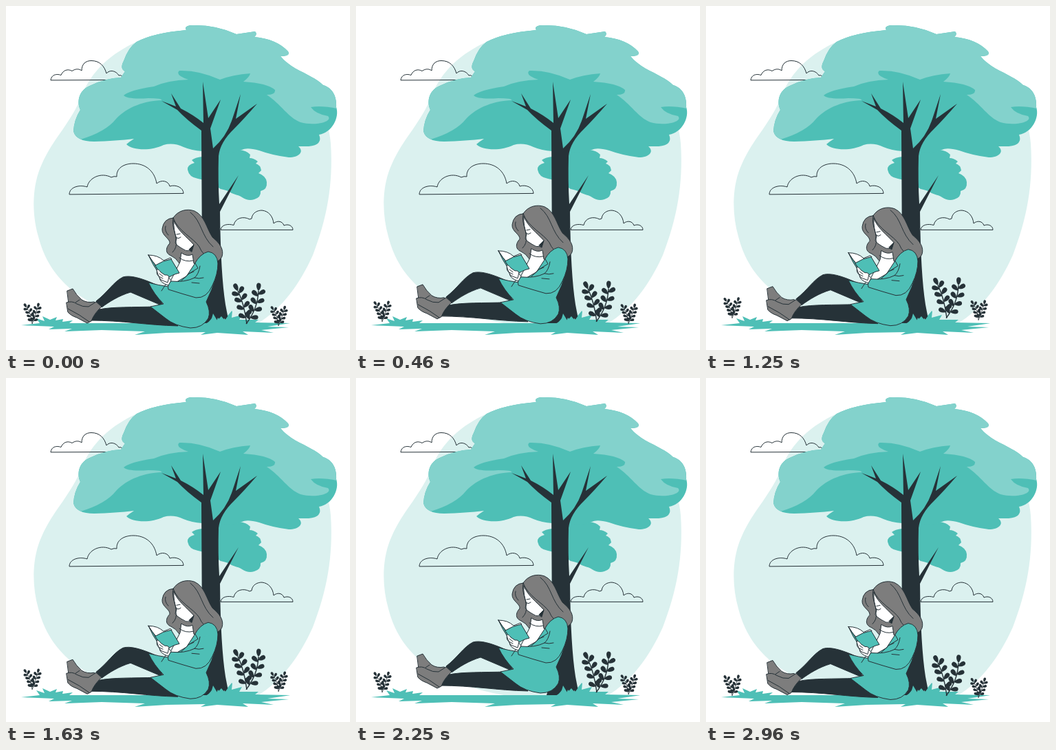
These frames come from a looping animation (500 px wide and 500 px high, 3 s). An HTML page:

```html
<!DOCTYPE html>
<html lang="en">
<head>
<meta charset="utf-8">
<title>Reading under a tree</title>
<style>
  html, body { margin: 0; width: 100%; height: 100%; overflow: hidden; background: #fff; }
  svg { display: block; width: 100vw; height: 100vh; }
  .teal { fill: #4ebfb6; }
  .light { fill: #83d2cc; }
  .dark { fill: #263238; }
  .gray { fill: #7d7d7d; }
  .white { fill: #fff; }
  .none { fill: none; }
  .line { stroke: #263238; stroke-width: 1; stroke-linejoin: round; stroke-linecap: round; }
</style>
</head>
<body>
<svg viewBox="0 0 500 500">
  <path fill="#dbf1ef" d="M192 51C152 69 125 94 110 130C96 168 68 193 52 230C38 260 37 300 47 335C60 385 95 440 220 462H365C402 440 428 402 446 362C466 310 476 260 472 200C470 160 440 110 400 90L200 60Z"/>

  <g class="line none">
    <path d="M65 107.500C66 100 73 98 80 100.500C83 93 90 91 96 94.500C101 91 106 91 110 94C110 84 116 79.500 124 79.500C136 79.500 143 87 146 98C151 92 160 94 164 101Q169 99 171 107Z"/>
    <path d="M92 273.500C92 264 105 259 118 263C120 250 138 241 153 249Q157 247 161 248C160 236 171 229 185 229C203 229 216 240 219 258C226 252 236 254 238 262C247 259 258 264 258 272Z"/>
    <path d="M312 325C313 318 322 316 331 318.500C333 308 345 305 354 310L357 309C358 300 366 297 372 297C382 298 388 306 389 316C395 311 402 313 404 319C411 316 417 320 417 325Z"/>
  </g>

  <!-- Tree -->
  <path class="teal" d="M285 219Q275 220 270 224L274 228Q263 231 264 238Q266 249 279 251Q285 252 296 256L312 266Q323 268 328 272C335 275 339 275 343 278Q352 284 361 281Q371 278 370 269Q380 267 379 256Q378 247 367 243L371 239Q370 231 363 229L366 226Q360 221 354 221L355 216Q350 210 338 209L300 205Z"/>
  <path class="teal" id="crown" d="M190 52Q215 39 262 35Q258 29 270 28Q305 27 335 41L362 37Q366 41 361 45Q393 48 410 66Q414 73 399 73Q406 82 421 91C436 99 452 106 461 115C475 119 481 132 480 147C485 162 474 184 455 187Q461 202 440 204L425 204C434 212 426 220 411 220Q387 217 368 210Q350 205 343 209Q325 216 310 213L285 211Q270 210 258 205Q243 198 229 202C211 211 184 210 175 201Q181 196 186 193Q160 196 128 197Q102 197 98 182Q99 165 108 151C102 137 107 121 124 115Q145 105 167 104L173 95Q165 91 171 80Q178 60 190 52Z"/>
  <clipPath id="crownClip"><use href="#crown"/></clipPath>
  <path class="light" clip-path="url(#crownClip)" d="M80 20H490V151Q461 144 443 147Q450 157 468 160C476 168 449 175 428 169C410 162 400 143 379 129Q392 129 391 122Q380 112 345 110Q354 103 355 98Q329 100 311 107Q280 93 252 94Q245 100 265 107Q235 108 215 117Q180 122 171 130Q177 136 207 134Q228 134 226 137C202 138 177 146 160 164Q145 183 108 194L80 200Z"/>
  <path class="teal" d="M22 464L49 461L44 454L56 458L53 451L64 456L74 452L72 457L83 455L82 459L97 457L92 461H280L284 452L292 458L296 444L304 456L310 444L316 456L329 443L328 453L343 449L339 456L367 456L362 460L413 461L380 466L411 467L371 471L389 475L344 473L352 478L307 475L283 478L290 474L234 475L187 478L202 473L139 471L85 473L96 469L62 470L70 466Z"/>
  <path class="dark" d="M226 138L247 146L240 127L254 149Q272 158 287 170L286 110L294 163L312 136L297 178L301 207Q320 190 328 167L341 128L334 164L365 142Q345 165 332 178Q311 198 309 218Q308 255 310 288L338 246L311 299Q312 390 319 434L324 460L317 454L315 461L308 453L305 460L299 454L293 461H277Q286 430 285 370L284 181Q262 165 249 151Z"/>
  <path class="teal" d="M290 462L298 457L301 447L307 457L313 451L318 457L328 443L327 455L340 453L334 462Z"/>

  <g id="plants" class="dark"></g>

  <g id="reader" class="line">
    <path class="dark" d="M135 441C155 437 185 438 218 437L250 465C205 464 170 457 122 457Z"/>
    <path class="dark" d="M218 405C196 395 180 391 170 394C156 401 148 416 131 429L139 438C150 430 164 421 181 416L228 436Z"/>
    <path class="gray" d="M89 414L97 411Q102 420 110 427Q118 432 128 430L138 437L128 449Q108 446 91 431Z"/>
    <path class="gray" d="M88 431Q96 428 103 433Q112 438 120 437L131 430L139 437Q128 447 124 458L118 461L103 453Q94 450 90 445Z"/>
    <path class="none" d="M90 440Q108 449 121 459M107 427L101 431"/>

    <!-- Hair and face -->
    <path class="gray" d="M243 308C250 297 263 294 274 298C289 305 291 322 300 336C311 345 317 354 314 364Q311 371 303 372L276 378L252 374Q247 366 240 363C230 359 233 350 238 345C239 338 226 334 227 324Q229 309 243 308Z"/>
    <path class="white" d="M244 312C249 326 262 335 273 347L269 356Q261 357 255 352L249 348L246 344L248 338Q243 326 244 312Z"/>
    <path class="none" d="M243 308C240 322 248 330 247 342Q249 351 242 358M243 308C250 328 273 337 281 350Q286 363 298 366M232 320Q230 327 236 333M268 300C285 313 283 334 301 350"/>
    <path class="none" d="M248 337Q251 339 254 336M248 332L253 331"/>
    <path class="dark" d="M266 354L273 347L270 357Z"/>
    <path class="white" d="M255 359Q264 365 271 361L273 374L279 378L264 400L238 402Q246 386 253 372Z"/>
    <path class="none" d="M252 366Q261 373 272 370"/>

    <!-- Coat -->
    <path class="teal" d="M274 375Q282 360 294 357Q307 359 308 374Q306 394 299 412L291 430Q298 444 294 454Q286 468 268 468Q245 465 232 454L210 437L229 433Q215 419 207 402Q222 406 236 408L262 393Z"/>
    <path class="none" d="M275 374L279 381L266 389L251 403M266 389L273 386M232 405L226 414"/>
    <path class="teal" d="M282 378Q280 390 274 395Q260 402 240 400Q234 405 236 412Q258 419 276 424Q292 425 300 406Q308 390 308 374"/>
    <path class="none" d="M274 395Q280 397 287 395M270 402L281 403"/>

    <!-- Hands and book -->
    <path class="white" d="M220 384Q217 389 223 394Q223 402 236 406L240 399L234 392L232 383Z"/>
    <path class="white" d="M207 362Q221 362 229 370L239 366L241 368L218 377Q212 371 207 362Z"/>
    <path class="teal" d="M207 362L217 377L231 399L228 398L214 376Z"/>
    <path class="teal" d="M217 377Q228 370 240 368L252 388Q242 390 231 398Z"/>
    <path class="white" d="M219 383Q222 382 225 387L231 391Q234 390 237 393L235 402L225 398L222 393Z"/>
    <path class="none" d="M223 389L228 393M222 393L228 396"/>
  </g>
</svg>
<script>
  const plants = document.getElementById('plants');
  const reader = document.getElementById('reader');

  // A curved stem with pairs of leaves on its sides and one at the tip.
  function stem(x0, y0, cx, cy, x1, y1, size, pairs) {
    const at = (a, b, c, u) => (1 - u) ** 2 * a + 2 * u * (1 - u) * b + u * u * c;
    const slope = (a, b, c, u) => (1 - u) * (b - a) + u * (c - b);
    const leaf = (u, turn) => {
      const dir = Math.atan2(slope(x0, cx, x1, u), -slope(y0, cy, y1, u)) * 180 / Math.PI;
      return `<path transform="translate(${at(x0, cx, x1, u)} ${at(y0, cy, y1, u)}) rotate(${dir + turn}) scale(${size})"
        d="M0 0C-.3 -.25 -.45 -1 0 -1C.45 -1 .3 -.25 0 0Z"/>`;
    };
    let out = `<path fill="none" stroke="#263238" stroke-width="${size / 8}" d="M${x0} ${y0}Q${cx} ${cy} ${x1} ${y1}"/>`;
    for (let i = 0; i < pairs; i++) {
      const u = 0.15 + 0.7 * i / (pairs - 1);
      out += leaf(u, -55) + leaf(u + 0.05, 55);
    }
    return out + leaf(1, 0);
  }

  plants.innerHTML =
    stem(38, 462, 37, 448, 30, 438, 6.5, 4) +
    stem(38, 462, 43, 450, 46, 438, 6.5, 4) +
    stem(350, 462, 346, 432, 337, 414, 11.5, 4) +
    stem(349, 462, 366, 440, 367, 414, 11.5, 4) +
    stem(396, 465, 395, 451, 389, 442, 6.5, 4) +
    stem(396, 465, 401, 453, 404, 442, 6.5, 4);

  const rise = (t, period) => -10 * (1 - Math.abs(1 - 2 * (t % period) / period));
  const move = (el, y) => el.setAttribute('transform', `translate(0 ${y})`);

  function draw() {
    const t = performance.now();
    move(reader, rise(t, 1500));
    move(plants, rise(t, 3000));
    requestAnimationFrame(draw);
  }
  draw();
</script>
</body>
</html>
```
